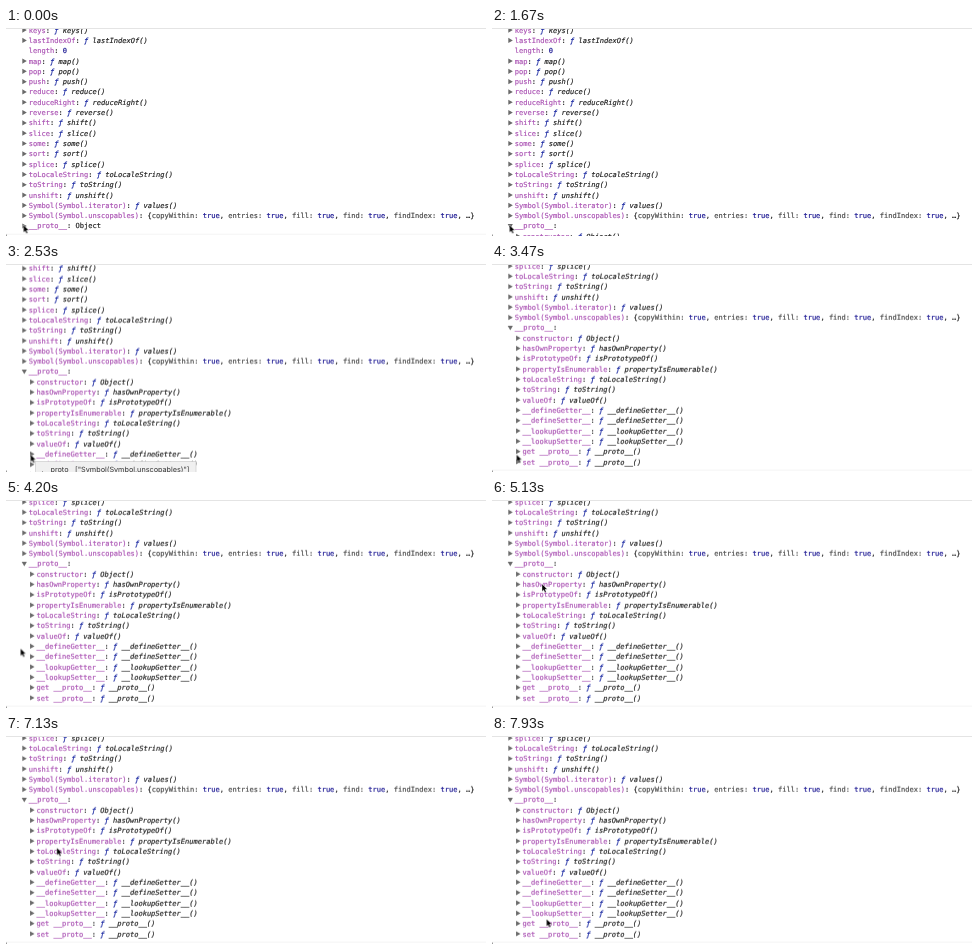
These frames come from a looping animation (480x208 px, 8 s). An HTML page:

```html
<!DOCTYPE html>
<html lang="en">
<head>
<meta charset="utf-8">
<title>Console prototype tree</title>
<style>
html, body { margin: 0; width: 100%; height: 100%; overflow: hidden; background: #fff; }
svg { display: block; width: 480px; height: 208px; }
text { font: 7.05px "DejaVu Sans Mono", "Liberation Mono", monospace; color: #1c1c1c; white-space: pre; text-rendering: geometricPrecision; }
text, tspan { fill: currentColor; stroke: currentColor; stroke-width: .16px; }
.name { color: #a950b2; }
.fn { font-style: italic; }
.f { color: #0d1c9c; font-style: italic; }
.val { color: #14108f; }
.key { color: #444; }
.arrow { fill: #6a6a6a; }
.tip text { font: 7.25px Inter, "Open Sans", sans-serif; color: #333; stroke: none; }

/* 120 picture steps per loop, 15 a second */
#list, #mouse, .closed, .open, .tip { animation: 8s -5ms infinite step-end; }
#list { animation-name: scroll; }
#mouse { animation-name: mouse; }
.closed { animation-name: closed; }
.open { animation-name: open; }
.tip { animation-name: tip; }

@keyframes closed { 0% { opacity: 1; } 10%, 100% { opacity: 0; } }
@keyframes open { 0% { opacity: 0; } 10%, 100% { opacity: 1; } }
@keyframes tip { 0% { opacity: 0; } 30.833% { opacity: 1; } 32.5%, 100% { opacity: 0; } }
@keyframes scroll {
  0% { transform: translateY(0); }
  22.5% { transform: translateY(0); animation-timing-function: steps(5); }
  26.667% { transform: translateY(-36.2px); animation-timing-function: steps(6); }
  31.667% { transform: translateY(-90.4px); }
  32.5%, 100% { transform: translateY(-134.2px); }
}
@keyframes mouse {
  0% { transform: translate(17.5px, 197px); }
  20.833% { transform: translate(17.5px, 197px); animation-timing-function: steps(2); }
  22.5% { transform: translate(24.5px, 190.5px); }
  48.333% { transform: translate(24.5px, 190.5px); animation-timing-function: steps(5); }
  52.5% { transform: translate(14.5px, 148.5px); animation-timing-function: steps(4); }
  55.833% { transform: translate(40px, 57px); animation-timing-function: steps(4); }
  59.167% { transform: translate(50px, 84px); }
  80.833% { transform: translate(50px, 84px); animation-timing-function: steps(13); }
  91.667% { transform: translate(51px, 120px); animation-timing-function: steps(9); }
  99.167%, 100% { transform: translate(54.5px, 183px); }
}
</style>
</head>
<body>
<svg viewBox="0 0 480 208">
  <g id="list"></g>
  <g class="tip">
    <rect x="29.5" y="197.5" width="160.5" height="14" fill="#f0f0f0" stroke="#ccc" stroke-width=".7"/>
    <text x="35.5" y="207.9">.__proto__["Symbol(Symbol.unscopables)"]</text>
  </g>
  <rect width="480" height="1" fill="#e4e4e4"/>
  <rect y="206.5" width="1" height="1.5" fill="#999"/>
  <path id="mouse" d="M0 0V7.4L1.7 5.9L2.9 8.5L4.2 7.9L3.1 5.3H5.3Z" fill="#000" stroke="#fff" stroke-width=".4"/>
</svg>
<script>
const PITCH = 10.31, TOP = 2.1, LEFT = 22.8, INDENT = 7.74;
const list = document.getElementById('list');

const span = (cls, s) => `<tspan class="${cls}">${s}</tspan>`;
const label = (name, value) => span('name', name) + ': ' + value;
const method = (name, called = name) =>
  label(name, span('f', 'ƒ ') + span('fn', called + '()'));

function arrow(y, depth, open) {
  const d = open ? 'm-2.6-2h5.2l-2.6 4.4z' : 'm-2-2.6l4.5 2.6l-4.5 2.6z';
  return `<path class="arrow" d="M${18.3 + depth * INDENT} ${y}${d}"/>`;
}

function row(i, body, depth = 0, mark = 'shut') {
  const y = TOP + i * PITCH;
  return (mark ? arrow(y, depth, mark === 'open') : '') +
    `<text x="${LEFT + depth * INDENT}" y="${y + 2.5}">${body}</text>`;
}

const rule = i =>
  `<rect y="${TOP + i * PITCH + 7.8}" width="480" height=".7" fill="#eee"/>`;

const flags = ['copyWithin', 'entries', 'fill', 'find', 'findIndex']
  .map(k => span('key', k + ': ') + span('val', 'true') + ', ').join('');

const arrayRows = [
  ...['keys', 'lastIndexOf'].map(n => method(n)),
  label('length', span('val', '0')),
  ...('map pop push reduce reduceRight reverse shift slice some sort splice ' +
    'toLocaleString toString unshift').split(' ').map(n => method(n)),
  method('Symbol(Symbol.iterator)', 'values'),
  label('Symbol(Symbol.unscopables)', `{${flags}…}`)
];

const objectRows = [
  method('constructor', 'Object'),
  ...('hasOwnProperty isPrototypeOf propertyIsEnumerable toLocaleString toString valueOf ' +
    '__defineGetter__ __defineSetter__ __lookupGetter__ __lookupSetter__')
    .split(' ').map(n => method(n)),
  method('get __proto__', '__proto__'),
  method('set __proto__', '__proto__')
];

const last = arrayRows.length;
list.innerHTML =
  arrayRows.map((r, i) => row(i, r, 0, i === 2 ? '' : 'shut')).join('') +
  `<g class="closed">${row(last, label('__proto__', 'Object'))}${rule(last)}</g>` +
  `<g class="open">${row(last, label('__proto__', ''), 0, 'open')}` +
  objectRows.map((r, i) => row(last + 1 + i, r, 1)).join('') +
  `${rule(last + objectRows.length)}</g>`;
</script>
</body>
</html>
```
